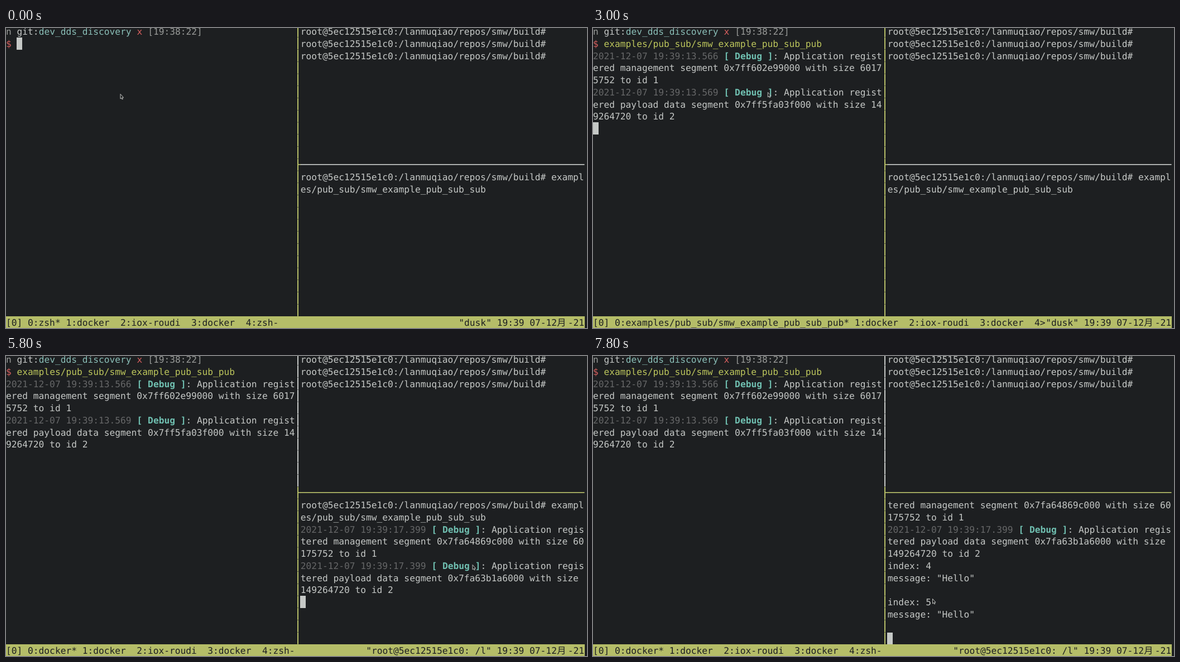
Recreate the animation shown at these times as an HTML page. Size 1041 by 538 pixels, loop 8000 ms.

```html
<!DOCTYPE html>
<html lang="en">
<head>
<meta charset="utf-8">
<title>Terminal session</title>
<style>
  html, body { margin: 0; width: 100%; height: 100%; overflow: hidden; background: #1d1f21; }
  svg { display: block; width: 1041px; height: 538px; }
  text {
    font: 16.236px "DejaVu Sans Mono", monospace;
    font-variant-ligatures: none;
    white-space: pre;
    text-rendering: geometricPrecision;
    fill: #c5c8c6;
  }
  text.dim { fill: #999b99; }
  text.stamp { fill: #666768; }
  text.red { fill: #d9605f; }
  text.teal { fill: #8abeb7; }
  text.level { fill: #70c0b1; font-weight: 700; }
  text.command { fill: #bcc55c; }
  text.bar { fill: #1d1f21; }
  text.cjk { font-family: "Noto Sans CJK SC", "Noto Sans CJK JP", "Noto Sans CJK", sans-serif; }
</style>
</head>
<body>
<svg viewBox="0 0 1041 538">
  <g id="screen"></g>
  <path id="pointer" d="M.5 .5V9L2.4 7.3L3.6 10L4.9 9.4L3.8 6.7H6Z"
        fill="#151617" stroke="#d4d6d4" stroke-width=".9" stroke-linejoin="round"/>
</svg>
<script>
const LOOP = 8000, TICK = 100;
const CELL = 9.775, LINE = 21.75, TOP = -4.7, BASE = 16.7;
const RIGHT = 54, COLS = 106;
const GREEN = '#b5bd68', GREY = '#c5c8c6';

const screenLayer = document.getElementById('screen');
const pointer = document.getElementById('pointer');

const x = col => col * CELL;
const y = row => TOP + row * LINE;
const rect = (left, top, width, height, fill) =>
  `<rect x="${left}" y="${top}" width="${width}" height="${height}" fill="${fill}"/>`;
const put = (col, row, text, style = '') =>
  `<text x="${x(col)}" y="${y(row) + BASE}" class="${style}">${text.replace(/>/g, '&gt;')}</text>`;
const block = (col, row) => rect(Math.floor(x(col)), Math.round(y(row)), 10, 22, GREY);

const lines = (col, row, list) => list.map((line, i) => {
  if (typeof line === 'string') return put(col, row + i, line);
  const [stamp, rest] = line;
  return put(col, row + i, '2021-12-07 ' + stamp, 'stamp') +
    put(col + 24, row + i, '[ Debug ]', 'level') +
    put(col + 33, row + i, rest);
}).join('');

const PROMPT = 'root@5ec12515e1c0:/lanmuqiao/repos/smw/build#';
const PUB = 'examples/pub_sub/smw_example_pub_sub_pub';
const PUB_LOG = [
  ['19:39:13.566', ': Application regist'],
  'ered management segment 0x7ff602e99000 with size 6017',
  '5752 to id 1',
  ['19:39:13.569', ': Application regist'],
  'ered payload data segment 0x7ff5fa03f000 with size 14',
  '9264720 to id 2'
];
const SUB_COMMAND = [PROMPT + ' exampl', 'es/pub_sub/smw_example_pub_sub_sub'];
const SUB_LOG = [
  ['19:39:17.399', ': Application regis'],
  'tered management segment 0x7fa64869c000 with size 60',
  '175752 to id 1',
  ['19:39:17.399', ': Application regis'],
  'tered payload data segment 0x7fa63b1a6000 with size',
  '149264720 to id 2'
];
const message = index => ['index: ' + index, 'message: "Hello"', ''];

function publisher(t) {
  const typed = t < 400 ? 0 : t < 800 ? 5 : PUB.length;
  return put(0, 0, 'n', 'dim') + put(2, 0, 'git:') +
    put(6, 0, 'dev_dds_discovery', 'teal') + put(24, 0, 'x', 'red') +
    put(26, 0, '[19:38:22]', 'dim') + put(0, 1, '$', 'red') +
    put(2, 1, PUB.slice(0, typed), t < 800 ? 'red' : 'command') +
    (t < 1900 ? block(2 + typed, 1) : lines(0, 2, PUB_LOG) + (t < 3400 ? block(0, 8) : ''));
}

function subscriber(t) {
  const output = [...SUB_COMMAND];
  if (t >= 5800) output.push(...SUB_LOG);
  if (t >= 5900) output.push(...message(4));
  if (t >= 7000) output.push(...message(5));
  const visible = output.slice(-11);
  const caret = t < 4800 ? '' : t < 5800 ? block(RIGHT + 35, 13) : block(RIGHT, 12 + visible.length);
  return lines(RIGHT, 12, visible) + caret;
}

function borders(t) {
  let out = '';
  for (let row = 0; row < 24; row++) {
    const active = t < 3400 || row === 11 || (t < 4800 ? row < 11 : row > 11);
    out += rect(522, y(row), 2, LINE - .5, active ? GREEN : GREY);
  }
  return out + rect(523, 244, 5, 1.7, GREEN) +
    rect(527.5, 244, 509, 1.7, t < 3400 ? GREY : GREEN);
}

function statusBar(t) {
  const name = t < 2400 ? 'zsh' : t < 3400 ? PUB : 'docker';
  const title = t < 3400 ? 'dusk' : 'root@5ec12515e1c0: /l';
  const start = COLS - title.length - 19;
  let list = `[0] 0:${name}* 1:docker  2:iox-roudi  3:docker  4:zsh-`;
  if (list.length > start) list = list.slice(0, start - 1) + '>';
  return rect(0, 517, 1037, 21, GREEN) + put(0, 24, list, 'bar') +
    put(start, 24, `"${title}" 19:39 07-12`, 'bar') +
    put(COLS - 5, 24, '月', 'bar cjk') + put(COLS - 3, 24, '-21', 'bar');
}

const draw = t => publisher(t) +
  lines(RIGHT, 0, [PROMPT, PROMPT, PROMPT]) +
  (t >= 3400 && t < 4800 ? block(RIGHT + 46, 2) : '') +
  subscriber(t) + borders(t) + statusBar(t);

// Pointer stops: time, x, y
const PATH = [
  [0, 204.5, 118], [2900, 204.5, 118], [3300, 897.5, 98], [4400, 897.5, 98],
  [4700, 835.5, 374], [6900, 835.5, 374], [7000, 827, 374], [7800, 608, 435], [LOOP, 608, 435]
];

function pointerAt(t) {
  const i = PATH.findIndex(stop => stop[0] > t);
  const [t0, x0, y0] = PATH[i - 1], [t1, x1, y1] = PATH[i];
  const p = (t - t0) / (t1 - t0), ease = p * p * (3 - 2 * p);
  return [x0 + (x1 - x0) * ease, y0 + (y1 - y0) * ease];
}

let shown = -1;
function frame() {
  const t = Math.floor(performance.now() % LOOP / TICK) * TICK;
  if (t !== shown) {
    shown = t;
    screenLayer.innerHTML = draw(t);
    pointer.setAttribute('transform', `translate(${pointerAt(t)})`);
  }
  requestAnimationFrame(frame);
}
frame();
</script>
</body>
</html>
```
